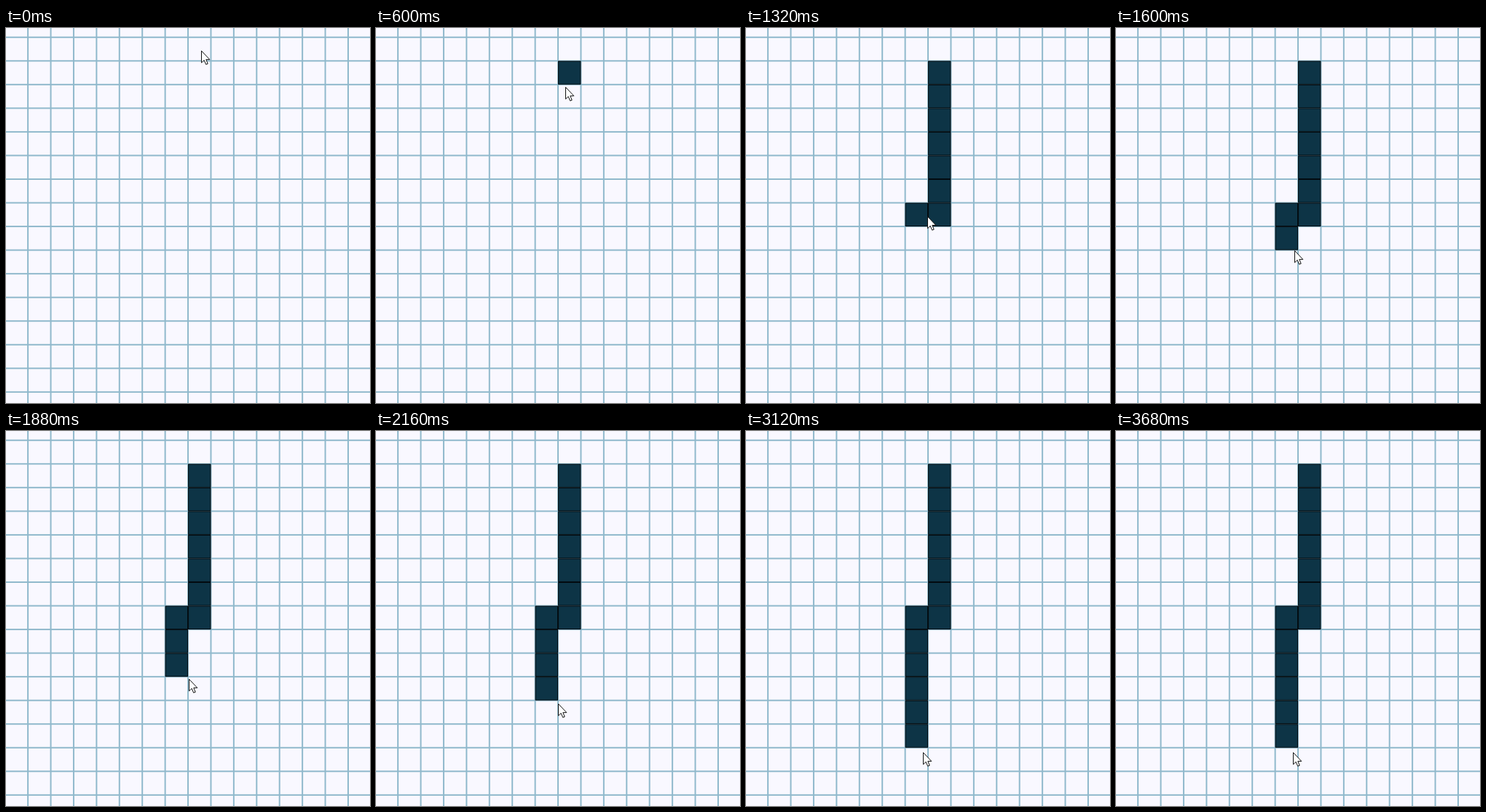
An HTML page with a canvas that plays this animation: 500x516 px, repeating every 3720 ms.

```html
<!DOCTYPE html>
<html lang="en">
<head>
<meta charset="utf-8">
<title>Drawing on a grid</title>
<style>
  html, body { margin: 0; width: 100%; height: 100%; overflow: hidden; background: #f9f8ff; }
  canvas { display: block; }
</style>
</head>
<body>
<canvas id="stage" width="500" height="516"></canvas>
<script>
const W = 500, H = 516, LOOP = 3720, STEP = 40;
const ctx = document.getElementById('stage').getContext('2d');
const PAPER = '#f9f8ff', LINE = '#90b9cc', INK = '#0d3446', EDGE = '#020a0e';

const colX = i => 30.1 + 31.42 * i;
const rowY = j => 12.75 + 32.54 * j;

// pointer stops: time, x, y, rest
const stops = [
  [0, 268, 31, 0],
  [80, 265, 31, 120],
  [240, 266, 29, 120],
  [600, 260, 81, 80],
  [920, 275, 139, 0],
  [1080, 253, 182, 0],
  [1440, 247, 297, 40],
  [1600, 245, 306, 0],
  [1760, 252, 326, 0],
  [2600, 247, 428, 280],
  [3120, 243, 442, LOOP]
];

// a cell fills once the pointer is this far below its top
const LAG = 8;
const cells = [];
for (let row = 1; row <= 7; row++) cells.push([7, row]);
for (let row = 7; row <= 12; row++) cells.push([6, row]);

function pointer(t) {
  const k = stops.findLastIndex(s => s[0] <= t);
  const [t0, x0, y0, rest] = stops[k];
  const [t1, x1, y1] = stops[k + 1] || stops[k];
  const f = Math.max(0, t - t0 - rest) / Math.max(1, t1 - t0 - rest);
  return [x0 + (x1 - x0) * f, y0 + (y1 - y0) * f].map(Math.round);
}

function box(color, x, y, w, h) {
  ctx.fillStyle = color;
  ctx.fillRect(x, y, w, h);
}

function drawGrid() {
  box(PAPER, 0, 0, W, H);
  for (let i = 0; colX(i) < W; i++) box(LINE, colX(i) - 1, 0, 2, H);
  for (let j = 0; rowY(j) < H; j++) box(LINE, 0, rowY(j) - 1, W, 2);
}

// the dark edge lies inside the cell, so neighbours keep their own border
function drawCell(col, row) {
  const x = colX(col), y = rowY(row);
  const w = colX(col + 1) - x, h = rowY(row + 1) - y;
  box(EDGE, x, y, w, h);
  box(INK, x + 1, y + 1, w - 2, h - 2);
}

const arrow = new Path2D('M.5 .5V16.8L4.2 13.3L6.7 19.2L9.2 18.2L6.8 12.4H11.8Z');

function drawPointer(x, y) {
  ctx.save();
  ctx.translate(x, y);
  ctx.fillStyle = '#fff';
  ctx.fill(arrow);
  ctx.strokeStyle = '#111';
  ctx.stroke(arrow);
  ctx.restore();
}

function draw(t) {
  const [x, y] = pointer(t);
  drawGrid();
  for (const [col, row] of cells) {
    if (y >= rowY(row) + LAG) drawCell(col, row);
  }
  drawPointer(x, y);
}

const start = performance.now();
function tick() {
  const t = (performance.now() - start) % LOOP;
  draw(Math.floor(t / STEP) * STEP);
  requestAnimationFrame(tick);
}
tick();
</script>
</body>
</html>
```
